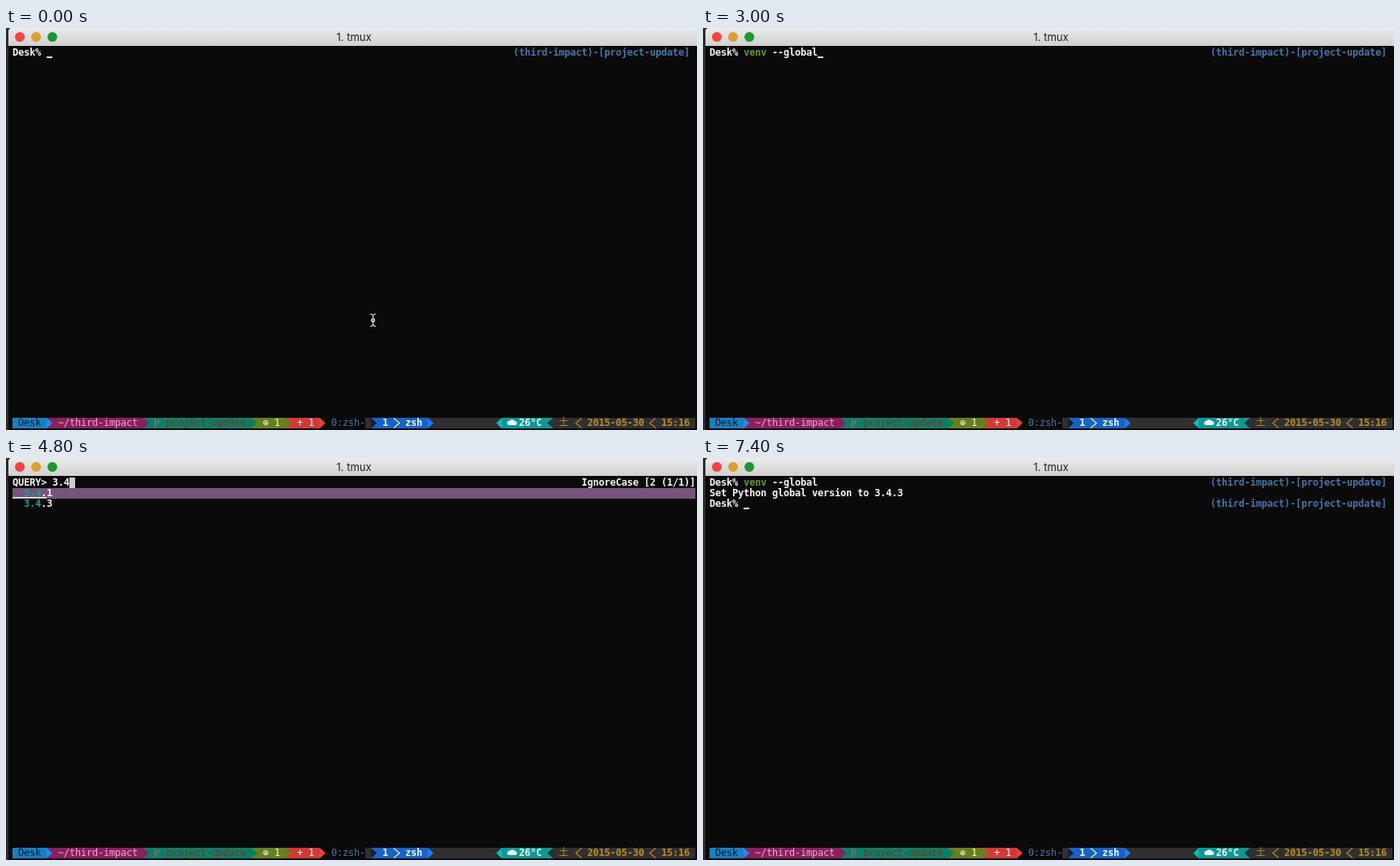
An HTML page for the animation above (7600 ms loop, 850x494 px).

```html
<!DOCTYPE html>
<html lang="en">
<head>
<meta charset="utf-8">
<title>tmux</title>
<style>
  html, body { margin: 0; width: 100%; height: 100%; overflow: hidden; background: #0a0a0a; }
  svg { display: block; }
  text { font: 12px "DejaVu Sans Mono", "Noto Sans CJK JP", "Noto Sans CJK", monospace; }
  .bold { font-weight: 700; }
  .title { font: 13px Inter, Roboto, sans-serif; }
</style>
</head>
<body>
<svg width="850" height="494" viewBox="0 0 850 494">
  <defs>
    <linearGradient id="chrome" x2="0" y2="1">
      <stop stop-color="#ebebeb"/><stop offset="1" stop-color="#d0d0d0"/>
    </linearGradient>
  </defs>
  <rect width="850" height="494" fill="#0a0a0a"/>
  <rect width="3" height="494" fill="#2c2c2c"/>
  <path d="M3 22V4Q3 0 7 0H850V22Z" fill="url(#chrome)"/>
  <circle cx="17" cy="11" r="6" fill="#f8423f"/>
  <circle cx="37" cy="11" r="6" fill="#dda02e"/>
  <circle cx="57" cy="11" r="6" fill="#189a30"/>
  <text class="title" x="428" y="16" text-anchor="middle" fill="#222">1. tmux</text>
  <g id="status"></g>
  <g id="screen"></g>
  <g id="pointer" fill="none" stroke="#ddd" stroke-width="1.2">
    <path d="M448 351.5Q451.500 351.500 451.500 354V364Q451.500 366.500 448 366.500M455 351.500Q451.500 351.500 451.500 354M451.500 364Q451.500 366.500 455 366.500"/>
    <circle cx="451.500" cy="359" r="2"/>
  </g>
</svg>
<script>
const CELL = 7, LINE = 13, LEFT = 8, TOP = 24, LOOP = 7600;
const WHITE = '#f4f4f4', GREY = '#303030', GOLD = '#b88a24', TEAL = '#12a09c', BLUE = '#4475a8';
const screenLayer = document.getElementById('screen');
const statusLayer = document.getElementById('status');
const pointer = document.getElementById('pointer');
let layer = statusLayer;

const colX = col => LEFT + col * CELL;
const rowY = row => TOP + row * LINE;

function add(tag, attrs, content = '') {
  const node = document.createElementNS('http://www.w3.org/2000/svg', tag);
  for (const key in attrs) node.setAttribute(key, attrs[key]);
  node.textContent = content;
  layer.append(node);
}

function write(col, row, string, fill = WHITE, weight = 'bold') {
  if (!string) return;
  const x = [...string].map((_, i) => colX(col + i)).join(' ');
  add('text', { x, y: rowY(row) + 10, fill, class: weight }, string);
}

const box = (x, y, width, height, fill) => add('rect', { x, y, width, height, fill });
const cells = (col, row, count, fill) => box(colX(col), rowY(row), count * CELL, LINE, fill);

// Powerline separators: dir 1 points right, -1 points left.
function wedge(col, dir, fill) {
  const base = colX(dir > 0 ? col : col + 1);
  add('path', { d: `M${base} 479l${dir * CELL} 6.5l${-dir * CELL} 6.5z`, fill });
}
function chevron(col, dir, stroke) {
  const base = colX(dir > 0 ? col : col + 1);
  add('path', { d: `M${base} 479.5l${dir * CELL} 6l${-dir * CELL} 6`, stroke, fill: 'none', 'stroke-width': 1.2 });
}

function drawStatus() {
  const row = 35;
  const segments = [
    [0, 6, '#1580c6', '#1c8ef0'],
    [6, 17, '#89205f', '#89205f'],
    [23, 19, '#0d7e66', '#0d7e66'],
    [42, 6, '#66801e', '#66801e'],
    [48, 6, '#cf3a38', '#f23c3a'],
    [62, 58, GREY, null],
    [63, 10, '#1763c8', '#1e7af0']
  ];
  for (const [col, count, fill] of segments) cells(col, row, count, fill);
  for (const [col, count, , tip] of segments) if (tip) wedge(col + count, 1, tip);

  write(1, row, 'Desk', '#101820', '');
  write(8, row, '~/third-impact', '#f0a6cc', '');
  add('path', { d: 'M183.500 480V491M184 487Q188 486 188 481', stroke: '#71706c', fill: 'none', 'stroke-width': 2 });
  write(27, row, 'project-update', '#803022', '');
  write(44, row, '⊕ 1', WHITE, '');
  write(50, row, '+ 1', WHITE, '');
  write(56, row, '0:zsh-', BLUE, '');
  wedge(63, 1, '#1c1c24');
  write(65, row, '1');
  chevron(67, 1, WHITE);
  write(69, row, 'zsh');

  wedge(85, -1, '#12b8b4');
  cells(86, row, 8, '#0b9996');
  add('path', { d: 'M619 488a2.500 2.500 0 0 1 0-5a4 3.500 0 0 1 7 0a2.500 2.500 0 0 1 0 5z', fill: WHITE });
  write(89, row, '26°C');
  wedge(94, -1, '#0b9996');
  cells(94, row, 1, '#0b9996');
  wedge(94, -1, GREY);
  write(96, row, '土', GOLD, '');
  chevron(99, -1, GOLD);
  write(101, row, '2015-05-30', GOLD);
  chevron(112, -1, GOLD);
  write(114, row, '15:16', GOLD);
}

function prompt(row, command = '', active = true) {
  const name = command.split(' ')[0];
  write(0, row, 'Desk%');
  write(6, row, name, name === 'venv' ? '#5f9a2c' : '#f04040');
  write(7 + name.length, row, command.slice(name.length + 1));
  write(88, row, '(third-impact)-[project-update]', BLUE);
  if (active) box(colX(6 + command.length), rowY(row) + 11, CELL, 2, WHITE);
}

const versions = ['2.7.3', '3.3.3', '3.3.5', '3.4.1', '3.4.3'];

function picker(query, selected, arrow) {
  const matches = versions.filter(version => version.includes(query));
  write(0, 0, 'QUERY> ' + query);
  cells(7 + query.length, 0, 1, '#ccc');
  write(100, 0, `IgnoreCase [${matches.length} (1/1)]`);
  matches.forEach((version, i) => {
    const row = i + 1;
    if (i === selected) {
      cells(0, row, 120, '#75567a');
      box(LEFT, rowY(row) + 11, i ? 840 : 42, 1.5, WHITE);
    }
    const parts = query ? version.split(query) : [version];
    let col = 2;
    parts.forEach((part, n) => {
      if (n) {
        write(col, row, query, TEAL);
        col += query.length;
      }
      write(col, row, part);
      col += part.length;
    });
  });
  if (arrow) {
    cells(118, 34, 1, '#ddd');
    write(118, 34, '↓', '#111');
  }
}

function result() {
  prompt(0, 'venv --global', false);
  write(0, 1, 'Set Python global version to 3.4.3');
  prompt(2);
}

const type = command => () => prompt(0, command);
const steps = [
  [0, type('')],
  [1000, type('v')],
  [1200, type('ve')],
  [1400, type('ven')],
  [1600, type('venv')],
  [1800, type('venv ')],
  [2000, type('venv --')],
  [2200, type('venv --g')],
  [2400, type('venv --gl')],
  [2600, type('venv --glob')],
  [2800, type('venv --global')],
  [3400, () => picker('', 0)],
  [4200, () => picker('3', 0)],
  [4400, () => picker('3.', 0)],
  [4600, () => picker('3.4', 0)],
  [5000, () => picker('3.4', 1, true)],
  [5600, result]
];

let current;
function render() {
  const time = performance.now() % LOOP;
  const step = steps.findLast(([start]) => start <= time);
  if (step !== current) {
    current = step;
    screenLayer.replaceChildren();
    step[1]();
    pointer.style.display = step === steps[0] ? '' : 'none';
  }
  requestAnimationFrame(render);
}

drawStatus();
layer = screenLayer;
render();
</script>
</body>
</html>
```
